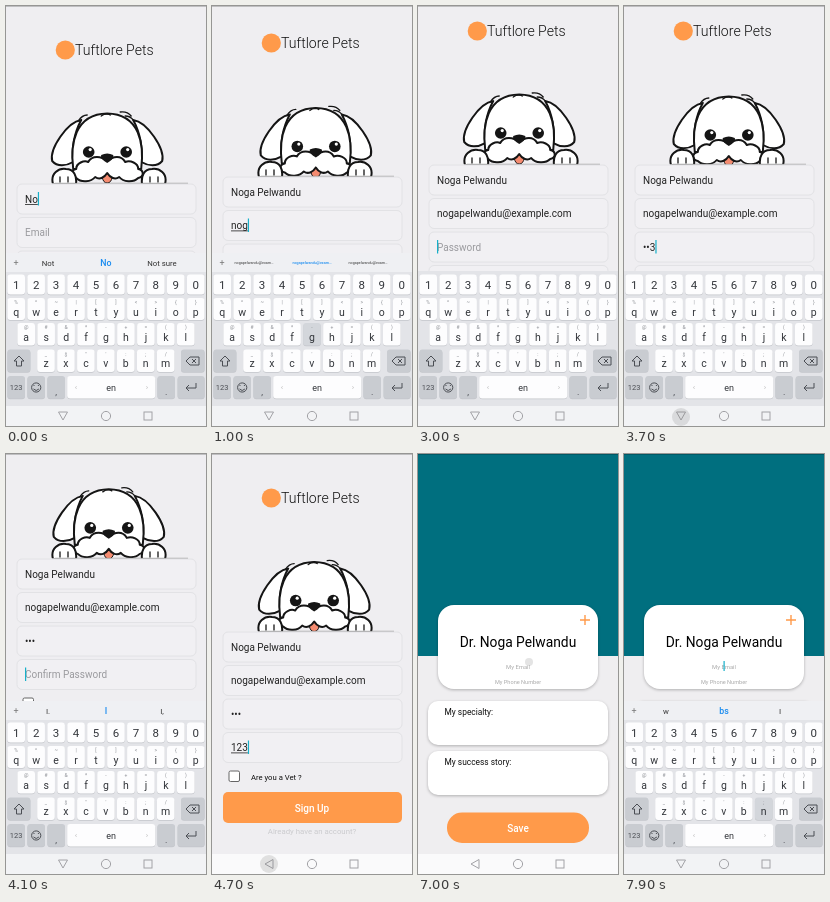
An HTML page for the animation above (8 s loop, 200 px wide and 420 px high).

```html
<!DOCTYPE html>
<html lang="en">
<head>
<meta charset="utf-8">
<title>Pet app sign up</title>
<style>
html, body { margin: 0; width: 100%; height: 100%; overflow: hidden; background: #efeef1; }
svg { display: block; width: 100vw; height: 100vh; }
text { font-family: Roboto, Arial, sans-serif; fill: #222; }
.ink { fill: #fff; stroke: #151515; stroke-width: 2; stroke-linecap: round; stroke-linejoin: round; }
.thin { fill: none; stroke: #151515; stroke-width: 1.3; stroke-linecap: round; }
.card { fill: #fff; filter: drop-shadow(0 1px 1.5px #0004); }
.nav { fill: none; stroke: #a2a2a6; stroke-width: 1; }
.icon { fill: none; stroke: #4b4e54; stroke-width: 1; stroke-linejoin: round; }
</style>
</head>
<body>
<svg viewBox="0 0 200 420">
  <defs>
    <clipPath id="ground"><rect y="60" width="200" height="117.5"/></clipPath>
    <g id="brand"><circle cx="59.3" cy="44" r="9.6" fill="#ff9a4a"/></g>
    <g id="ear">
      <path class="ink" d="M77 115C63 117 45 144 48 156C53 162 62 161 69 157C67 144 70 128 77 115Z"/>
    </g>
    <g id="paw">
      <path class="ink" d="M47 178C44 167 53 162 60 163C68 163 71 170 70 178Z"/>
      <path class="thin" d="M54 176v-5M62 176v-5"/>
    </g>
    <path id="whiskers" d="M97 142H61M97 139L67 125M97 146L67 160" stroke="#777" stroke-width=".7"/>
  </defs>
  <rect width="200" height="420" fill="#efeef1"/>

  <g id="signup">
    <use href="#brand"/>
    <g clip-path="url(#ground)">
      <g id="head">
        <use href="#ear"/>
        <use href="#ear" transform="translate(206) scale(-1 1)"/>
        <path class="ink" d="M69 164C66 140 70 109 103 108.500C136 109 140 140 137 164Z"/>
        <path class="thin" d="M74 116q4-6 9-6M116 107q7-1 11 4M121 111q5 0 8 4M97 111q5-4 9-1"/>
        <g fill="#151515">
          <circle cx="84.500" cy="147" r="5.800"/><circle cx="122" cy="147" r="5.800"/>
        </g>
        <g fill="#fff"><circle cx="86" cy="144.600" r="1.600"/><circle cx="123.500" cy="144.600" r="1.600"/></g>
        <path d="M98 168h10v4q-1 6-5 6t-5-6z" fill="#f58b70" stroke="#151515"/>
        <path class="ink" d="M72 173C66 172 66 165 72 164C72 158 80 155 84 157C88 150 97 151 103 156C109 151 117 150 121 157C126 155 134 158 134 164C140 165 140 172 134 173C129 178 119 177 115 172C111 175 106 173 103 168C100 173 95 175 91 172C87 177 77 178 72 173Z"/>
        <path d="M97 150q6-3 12 0q1 3-3 6l-3 2l-3-2q-4-3-3-6z" fill="#151515"/>
      </g>
      <use href="#paw"/>
      <use href="#paw" transform="translate(206) scale(-1 1)"/>
    </g>
    <path d="M49 177.300H182" stroke="#888" stroke-width=".8"/>
    <rect x="17" y="317" width="10.500" height="10.500" rx="1.500" fill="#fff" stroke="#555" stroke-width=".9"/>
    <path id="check" d="M19 322l3 3l4-6" fill="none" stroke="#ff8a30" stroke-width="1.600"/>
    <rect x="11" y="338" width="179" height="31" rx="5" fill="#ff9a4a"/>
  </g>

  <g id="login">
    <rect width="200" height="400" fill="#efeef1"/>
    <use href="#brand"/>
    <ellipse cx="82" cy="228" rx="50" ry="6" fill="#f8f8fa"/>
    <g id="tail">
      <path d="M64 212C36 196 33 166 45 132" fill="none" stroke="#6c4a20" stroke-width="8.500"/>
      <ellipse cx="52.500" cy="123" rx="14.500" ry="20.500" transform="rotate(30 52 123)" fill="#6c4a20"/>
    </g>
    <path d="M86 156C84 170 78 171 66 178C48 188 46 208 50 222C50 228 56 230 64 230H82C84 226 80 222 76 221C84 213 88 206 92 203V221C86 223 84 230 90 230H113C115 224 111 222 108 220C108 200 114 185 112 158Z" fill="#a6734b"/>
    <path d="M55 205q6-15 19-12q9 4 5 20" fill="none" stroke="#8f6040"/>
    <g id="face">
      <path d="M88 107L102 116Q116 112 130 116L143 107Q148 125 149 138Q147 160 116 163Q85 160 83 138Q84 122 88 107Z" fill="#a6734b"/>
      <path d="M89 111l9 7l-10 6zM142 111l-9 7l10 6z" fill="#7c5335"/>
      <use href="#whiskers"/>
      <use href="#whiskers" transform="translate(232) scale(-1 1)"/>
      <g fill="#fff"><circle cx="105.500" cy="137" r="9"/><circle cx="126" cy="137" r="9"/></g>
      <g fill="#2b2622" stroke="#8fc0c4" stroke-width="1.500">
        <circle cx="107" cy="137.500" r="4.600"/><circle cx="124.500" cy="137.500" r="4.600"/>
      </g>
      <path d="M112 146h7l-3.500 4z" fill="#4a3020"/>
      <ellipse cx="115.500" cy="156" rx="2.800" ry="3.800" fill="#3a231a"/>
    </g>
    <rect x="11" y="340" width="179" height="31" rx="5" fill="#ff9a4a"/>
  </g>

  <g id="profile">
    <rect width="200" height="400" fill="#efeef0"/>
    <rect width="200" height="202" fill="#006f7f"/>
    <rect class="card" x="20" y="151" width="160" height="84" rx="16"/>
    <path d="M162 166h10M167 161v10" stroke="#ff9a4a" stroke-width="1.400"/>
    <rect class="card" x="10" y="247" width="180" height="44" rx="10"/>
    <rect class="card" x="10" y="297" width="180" height="44" rx="10"/>
    <rect x="29" y="358.500" width="142" height="30.500" rx="15" fill="#ff9a4a"/>
    <rect id="mailCaret" x="99.500" y="207" width="1.200" height="10" fill="#16b0c9"/>
  </g>

  <g id="keyboard"><rect y="265" width="200" height="135" fill="#e3e4e8"/></g>
  <g id="navbar"><rect id="navBg" y="400" width="200" height="20"/></g>
  <circle id="touch" fill="#777" opacity=".2"/>
  <rect width="200" height=".8" fill="#000" opacity=".25"/>
</svg>
<script>
const NAME = 'Noga Pelwandu', MAIL = 'nogapelwandu@example.com', TYPO = 'nogapecwandu@example.com';
const LOOP = 8000, STEP = 100;
const $ = id => document.getElementById(id);
const show = (el, on) => { el.style.display = on ? '' : 'none'; };

function add(parent, tag, attrs) {
  const el = document.createElementNS('http://www.w3.org/2000/svg', tag);
  for (const k in attrs) el.setAttribute(k, attrs[k]);
  return parent.appendChild(el);
}
function label(parent, x, y, text, size, fill = '#222', anchor = 'middle', weight = 400) {
  const el = add(parent, 'text', { x, y, dy: '.35em', 'font-size': size, 'text-anchor': anchor, 'font-weight': weight });
  el.style.fill = fill;
  el.textContent = text;
  return el;
}
function makeField(parent, y, height, hint) {
  const mid = y + height / 2;
  add(parent, 'rect', { x: 11, y, width: 179, height, rx: 5, fill: '#f1f0f3', stroke: '#e2e2e5', 'stroke-width': 1 });
  const text = label(parent, 19, mid, '', 10, '#222', 'start');
  const line = add(parent, 'rect', { x: 19, y: mid + 5, height: .8, fill: '#222' });
  const caret = add(parent, 'rect', { y: mid - 7, width: 1.2, height: 13.5, fill: '#16b0c9' });
  return (value, focus, underline, at = value.length) => {
    text.textContent = value || hint;
    text.style.fill = value ? '#222' : '#9a9a9e';
    const width = n => n ? text.getSubStringLength(0, n) : 0;
    show(caret, focus);
    show(line, focus && underline && value);
    if (!focus) return;
    caret.setAttribute('x', 19 + width(at));
    line.setAttribute('width', width(value.length));
  };
}

// sign up, log in and profile pages
const signup = $('signup'), login = $('login'), profile = $('profile');
for (const page of [signup, login]) label(page, 69, 44, 'Tuftlore Pets', 14.1, '#111', 'start', 300);
const fields = ['Name', 'Email', 'Password', 'Confirm Password']
  .map((hint, i) => makeField(signup, 178 + 33.5 * i, 30, hint));
label(signup, 39, 323, 'Are you a Vet ?', 7.7, '#111', 'start');
label(signup, 100, 354, 'Sign Up', 10, '#fff', 'middle', 500);
label(signup, 100, 377.5, 'Already have an account?', 7.8, '#cbcbce');

makeField(login, 262.5, 33, '')(MAIL, false);
makeField(login, 299.5, 33, '')('•••', false);
label(login, 100, 356, 'Log In', 10, '#fff', 'middle', 500);
label(login, 100, 379.5, 'Not a member yet? Register now', 7.8, '#cbcbce');

label(profile, 100, 188, 'Dr. ' + NAME, 13.8, '#000');
label(profile, 100, 213, 'My Email', 5.9, '#aaa');
label(profile, 100, 228.5, 'My Phone Number', 5.6, '#aaa');
label(profile, 26.5, 258, 'My specialty:', 8.4, '#111', 'start');
label(profile, 26.5, 308, 'My success story:', 8.4, '#111', 'start');
label(profile, 100, 374, 'Save', 10, '#fff', 'middle', 500);
profile.append($('mailCaret'));

// keyboard
const board = $('keyboard'), keys = {};
function key(id, x, y, width, height, fill = '#fdfdfe') {
  add(board, 'rect', { x, y: y + .8, width, height, rx: 3, fill: '#c3c5ca' });
  keys[id] = add(board, 'rect', { x, y, width, height, rx: 3, fill });
  keys[id].base = fill;
}
function row(chars, hints, x0, y, height) {
  [...chars].forEach((c, i) => {
    const x = x0 + 19.95 * i;
    key(c, x - 8.8, y, 17.6, height);
    label(board, x, y + (hints ? 14 : height / 2), c, hints ? 10.5 : 11.5, '#33363b');
    if (hints) label(board, x, y + 4.5, hints[i], 5, '#8b8e94');
  });
}
row('1234567890', '', 10.2, 268.5, 20);
row('qwertyuiop', '%^~|[]<>{}', 10.2, 292, 22);
row('asdfghjkl', '@#&*-+=()', 20.2, 317, 22.5);
row('zxcvbnm', '_$"\':;/', 40, 343.5, 22.5);
const GREY = '#c9ccd1';
key('shift', 1.4, 343.5, 23, 22.5, GREY);
key('del', 175, 343.5, 23.6, 22.5, GREY);
key('123', 1.4, 370, 17.6, 22.5, GREY);
key('smile', 21.4, 370, 17.6, 22.5, GREY);
key(',', 41.4, 370, 17.6, 22.5, GREY);
key(' ', 61.2, 370, 88, 22.5);
key('.', 151.4, 370, 17.6, 22.5, GREY);
key('enter', 171.6, 370, 27, 22.5, GREY);
label(board, 10.2, 381.5, '123', 7.5, '#4b4e54');
label(board, 50.2, 386, ',', 9, '#4b4e54');
label(board, 160.2, 386, '.', 9, '#4b4e54');
label(board, 105, 381.5, 'en', 9, '#33363b');
label(board, 70, 381, '‹', 8, '#bbb');
label(board, 141, 381, '›', 8, '#bbb');
add(board, 'path', { class: 'icon', d: 'M13 350l-5 5h2.500v5h5v-5h2.500zM180 355l4-4h9v8h-9zM186 353l4 4m0-4l-4 4M190 377v5h-10m3-3l-3 3l3 3M27.500 383q2.700 3 5.400 0M28 379v1M32.400 379v1' });
add(board, 'circle', { class: 'icon', cx: 30.2, cy: 381.5, r: 4.6 });

const strip = add(board, 'g', {});
add(strip, 'rect', { y: 247, width: 200, height: 19, fill: '#eff0f3' });
label(strip, 10, 256.5, '+', 9, '#777');
const words = [42, 100, 156].map((x, i) => label(strip, x, 257, '', 8, i === 1 ? '#1a8cf0' : '#333', 'middle', i === 1 ? 500 : 400));

// navigation bar: the back arrow points down while the keyboard is open
const navbar = $('navbar');
const back = add(navbar, 'path', { class: 'nav', d: 'M53 410l8-4.500v9z' });
add(navbar, 'circle', { class: 'nav', cx: 100, cy: 410, r: 4.6 });
add(navbar, 'rect', { class: 'nav', x: 138, y: 406, width: 8, height: 8 });

// step lists: [time, value]
const held = (list, t) => list.reduce((v, [at, next]) => t >= at ? next : v, list[0][1]);
const SCROLL = [[0, 0], [800, 7], [2800, 19], [3800, 0], [4000, 40], [4100, 73], [4600, 0]];
const DROP = [[0, 0], [3800, 70], [3900, 160], [4000, 60], [4100, 0], [4600, 70], [4700, 160],
  [7100, 105], [7200, 50], [7300, 14], [7400, 0]];
const PASS = [[0, ''], [3200, '1'], [3400, '•2'], [3600, '••3'], [3800, '•••']];
const CONFIRM = [[0, ''], [4200, '1'], [4300, '12'], [4400, '123']];
const PRESS = [[0, ''], [2400, 'del'], [2500, 'l'], [2600, ''], [3200, '1'], [3300, ''], [3400, '2'], [3500, ''],
  [3600, '3'], [3700, ''], [4200, '1'], [4300, '2'], [4400, '3'], [4500, ''], [7900, 'n']];
const TOUCH = [[0, 0], [700, [60, 226, 5]], [800, 0], [2200, [57, 223, 5]], [2300, 0], [2700, [60, 253, 5]], [2800, 0],
  [3700, [57, 411, 9]], [3800, 0], [4000, [70, 270, 5]], [4100, 0], [4600, [57, 410, 9]], [4800, 0],
  [4900, [22, 322, 5]], [5000, 0], [5100, [100, 354, 7]], [5200, 0], [6200, [100, 356, 7]], [6300, 0],
  [7000, [111, 208, 4]], [7100, 0]];

function mailAt(t) {
  if (t < 900) return '';
  if (t < 1900) return TYPO.slice(0, 1 + Math.floor((t - 900) / STEP * 2.4));
  if (t < 2400) return TYPO;
  return t < 2500 ? MAIL.replace('l', '') : MAIL;
}
function suggestions(t, name) {
  if (t < 100) return ['Not', 'No', 'Not sure'];
  if (t < 700) { const w = name.split(' ').pop() || 'and'; return [w + 's', w, w + 'e']; }
  if (t < 900) return ['I', 'The', 'Hi'];
  if (t < 2800) { const m = MAIL.slice(0, 17) + '…'; return [m, m, m]; }
  if (t < 5000) { const n = held(CONFIRM, t) || 'I'; return [n + '.', n, n + ',']; }
  return ['w', 'bs', 'I'];
}
function enter(page, t, start) {
  const p = Math.min(1, Math.max(0, (t - start + STEP) / 300));
  show(page, p > 0);
  page.setAttribute('opacity', p < 1 ? .35 + p / 2 : 1);
  const s = p < 1 ? .925 + p * .075 : 1;
  page.setAttribute('transform', `translate(100 200) scale(${s}) translate(-100 -200)`);
}

function draw(t) {
  const name = NAME.slice(0, 2 + Math.floor(t / STEP * 1.9));
  const mail = mailAt(t);
  const focus = t < 700 ? 0 : t < 2700 ? 1 : t < 4000 ? 2 : 3;
  show(signup, t < 5400);
  if (t < 5400) {
    fields[0](name, focus === 0, true);
    fields[1](mail, focus === 1, true, t >= 2200 && t < 2600 ? (t === 2400 ? 6 : 7) : mail.length);
    fields[2](held(PASS, t), focus === 2, false);
    fields[3](held(CONFIRM, t), focus === 3, true);
  }
  show($('check'), t >= 4900);
  signup.setAttribute('transform', `translate(0 ${-held(SCROLL, t)})`);

  const sway = -Math.cos(t / 1480 * 2 * Math.PI);
  $('head').setAttribute('transform', `translate(${sway * 1.8} ${sway})`);
  const swing = Math.sin((t - 5800) / 1200 * 2 * Math.PI);
  $('tail').setAttribute('transform', `rotate(${swing * 5} 60 210)`);
  $('face').setAttribute('transform', `rotate(${swing * 1.5} 112 160)`);

  enter(login, t, 5200);
  enter(profile, t, 6300);
  show($('mailCaret'), t >= 7100 && !(t >= 7600 && t < 7800));

  const drop = held(DROP, t), open = drop < 160;
  show(board, open);
  board.setAttribute('transform', `translate(0 ${drop})`);
  show(strip, t < 2800 || t >= 4000);
  const small = t >= 900 && t < 2800;
  suggestions(t, name).forEach((w, i) => {
    words[i].textContent = w;
    words[i].setAttribute('font-size', small ? 3.7 : i === 1 ? 8.8 : 7.8);
  });
  let pressed = held(PRESS, t);
  if (t < 700) pressed = t ? name.slice(-1).toLowerCase() : '';
  else if (t >= 900 && t < 1900) pressed = mail.slice(-1);
  for (const k in keys) keys[k].setAttribute('fill', k === pressed ? '#d3d6db' : keys[k].base);

  $('navBg').setAttribute('fill', open ? '#f2f3f5' : '#fafafb');
  back.setAttribute('transform', open ? 'rotate(-90 57 410)' : '');
  const spot = held(TOUCH, t), touch = $('touch');
  show(touch, spot);
  if (spot) ['cx', 'cy', 'r'].forEach((a, i) => touch.setAttribute(a, spot[i]));
}

const start = performance.now();
let last = -1;
function tick() {
  const t = Math.floor((performance.now() - start) % LOOP / STEP) * STEP;
  if (t !== last) draw(last = t);
  requestAnimationFrame(tick);
}
tick();
</script>
</body>
</html>
```
